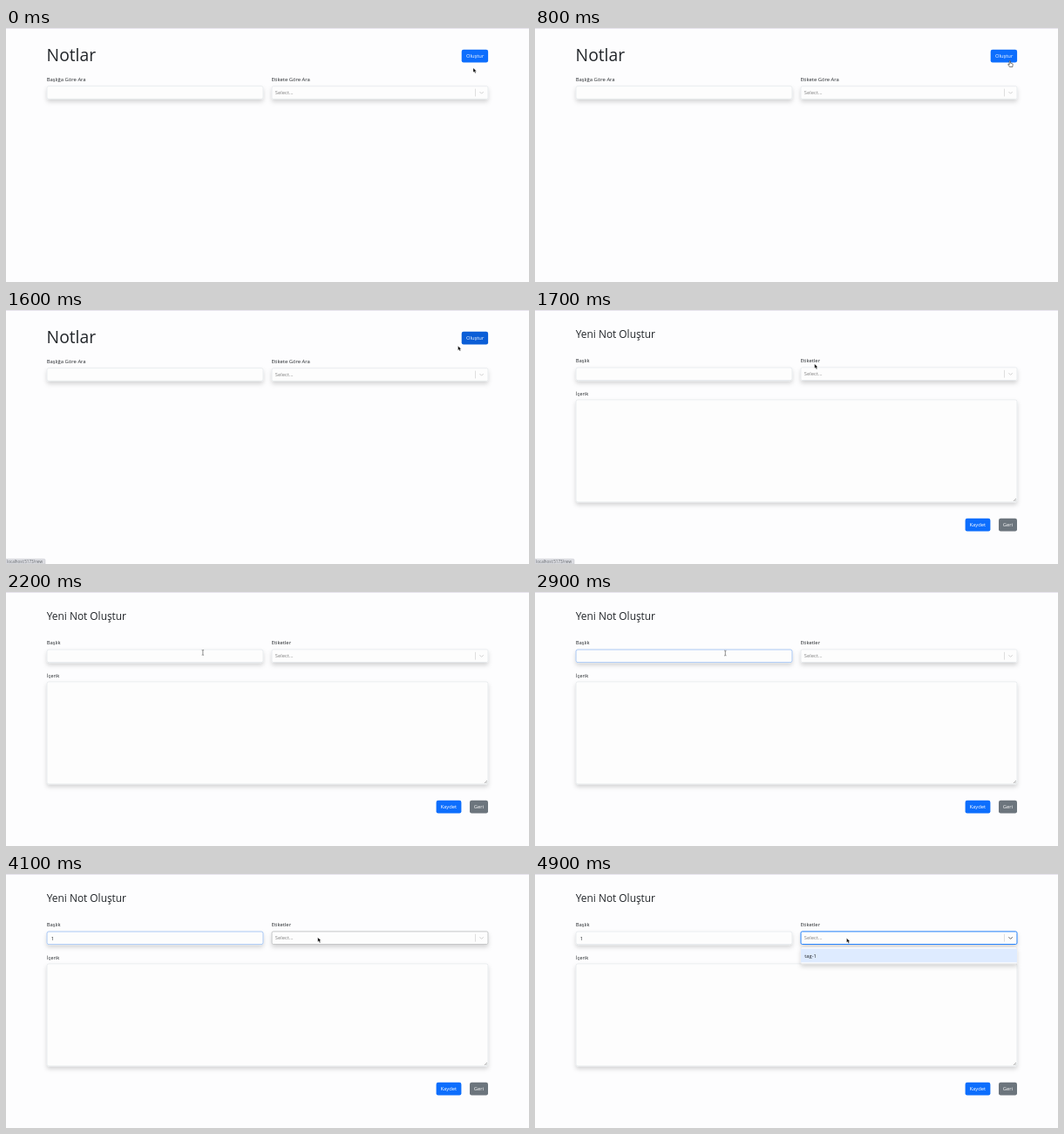
An HTML page for the animation above (5 s loop, 600x291 px).

```html
<!DOCTYPE html>
<html lang="tr">
<head>
<meta charset="utf-8">
<title>Notlar</title>
<style>
  html, body { margin: 0; width: 100%; height: 100%; overflow: hidden; background: #fdfdfe; }
  svg { display: block; width: 100vw; height: 100vh; }
  text { font-family: "Open Sans", "Noto Sans", sans-serif; font-size: 5.85px; fill: #212529; }
  .head { font-weight: 500; }
  .on { fill: #fff; }
  .hint { fill: #808080; }
  .box { fill: #fdfdfd; stroke: #dee2e6; stroke-width: .6; filter: url(#shade); }
  .line { fill: none; stroke-width: .6; }
</style>
</head>
<body>
<svg viewBox="0 0 600 291" preserveAspectRatio="none">
  <defs>
    <filter id="shade" filterUnits="userSpaceOnUse" x="30" y="50" width="540" height="190">
      <feDropShadow dx="0" dy="3" stdDeviation="2.8" flood-color="#000" flood-opacity=".17"/>
    </filter>
    <g id="select">
      <rect class="box" x="305" y="66.3" width="248" height="14.6" rx="1.6"/>
      <text class="hint" x="308.8" y="75.9">Select...</text>
      <path d="M538.5 69.2V78" stroke="#ccc" stroke-width=".6"/>
    </g>
    <path id="chevron" d="M543.7 72.9l1.9 1.9 1.9-1.9" fill="none" stroke-width=".9" stroke-linecap="round"/>
  </defs>

  <rect width="600" height="291" fill="#fdfdfe"/>
  <rect width="600" height="1" fill="#e6e3ec"/>

  <g id="list">
    <text class="head" x="46.6" y="38.4" style="font-size:19.3px">Notlar</text>
    <rect id="create" x="522.7" y="24.8" width="30.4" height="14.6" rx="2.2"/>
    <text class="on" x="527.9" y="34.4">Oluştur</text>
    <text x="46.8" y="61">Başlığa Göre Ara</text>
    <text x="304.8" y="61">Etikete Göre Ara</text>
    <rect class="box" x="47" y="66.6" width="248" height="14.6" rx="2"/>
    <g transform="translate(0 .4)">
      <use href="#select"/>
      <use href="#chevron" stroke="#ccc"/>
    </g>
  </g>

  <g id="form">
    <text class="head" x="46.8" y="31.7" style="font-size:11.9px">Yeni Not Oluştur</text>
    <text x="46.8" y="60.3">Başlık</text>
    <text x="304.8" y="60.3">Etiketler</text>
    <rect class="box" x="47" y="66" width="248" height="14.6" rx="2"/>
    <rect id="focus" class="line" x="47" y="66" width="248" height="14.6" rx="2" stroke="#86b7fe"/>
    <text id="typed" x="51.8" y="75.6">1</text>
    <text x="46.8" y="97.5">İçerik</text>
    <rect class="box" x="47" y="102.9" width="506" height="117" rx="2"/>
    <path d="M549 219l3-3M550.7 219l1.3-1.3" stroke="#666" stroke-width=".5"/>
    <g transform="translate(0 -.4)">
      <use href="#select"/>
      <rect id="ring" class="line" x="305" y="66.3" width="248" height="14.6" rx="1.6"/>
      <use id="arrowhead" href="#chevron"/>
    </g>
    <g id="menu">
      <rect x="305" y="84" width="248" height="18.8" rx="1.6" fill="#fff" stroke="#d9d9d9" stroke-width=".4" filter="url(#shade)"/>
      <rect x="305" y="85.5" width="248" height="15.8" fill="#deebff"/>
      <text x="309.2" y="95.6">tag-1</text>
    </g>
    <rect x="493.6" y="238.8" width="28.8" height="14.7" rx="2.2" fill="#0d6efd"/>
    <text class="on" x="498.4" y="248.4">Kaydet</text>
    <rect x="532" y="238.8" width="21" height="14.7" rx="2.2" fill="#6c757d"/>
    <text class="on" x="536.8" y="248.4">Geri</text>
  </g>

  <g id="status">
    <path d="M0 285.2H43.5q1.5 0 1.5 1.5V291H0z" fill="#dcdde2" stroke="#c4c5ca" stroke-width=".5"/>
    <text x="1.2" y="290.3" style="font-size:4.5px;fill:#5f6368">localhost:5173/new</text>
  </g>

  <g id="cursor">
    <path id="arrow" d="M0 0V5l1.2-1 .9 1.9 1-.5-.9-1.8h1.6z" fill="#000" stroke="#fff" stroke-width=".35"/>
    <path id="hand" d="M-.6 .4q.6-.9 1.2 0V2.8l2.2.6q.7.2.6 1L3 7.2H-.2L-2 4.6q-.2-.9.7-.6l.7.7z" fill="#fff" stroke="#111" stroke-width=".55" stroke-linejoin="round"/>
    <path id="beam" d="M-1.2-2.8H-.4L0-2.5.4-2.8H1.2M0-2.5V2.5M-1.2 2.8H-.4L0 2.5.4 2.8H1.2" fill="none" stroke="#444" stroke-width=".6"/>
  </g>
</svg>
<script>
const LOOP = 5000, STEP = 100;
const $ = id => document.getElementById(id);
const show = (id, on) => $(id).setAttribute("visibility", on ? "inherit" : "hidden");

// Pointer stops: time, x, y
const stops = [
  [0, 536, 45.8], [400, 536, 45.8], [800, 544.8, 37.4], [1500, 544.8, 37.4],
  [1600, 518.5, 41.2], [1700, 320.7, 61.8], [2300, 218.3, 70], [3300, 218.3, 70],
  [3800, 358.2, 70.3], [3900, 358.2, 70.3], [4200, 357.5, 73.6], [LOOP, 357.5, 73.6]
];

function pointer(t) {
  const i = stops.findIndex(s => s[0] > t);
  const [t0, x0, y0] = stops[i - 1], [t1, x1, y1] = stops[i];
  const u = (t - t0) / (t1 - t0), e = u * u * (3 - 2 * u);
  return [x0 + (x1 - x0) * e, y0 + (y1 - y0) * e];
}

function draw(t) {
  const within = (a, b) => t >= a && t < b;
  const [x, y] = pointer(t);
  const form = t >= 1700, open = t >= 4200;
  const overSelect = form && x > 305 && y > 66;

  show("list", !form);
  show("form", form);
  show("status", within(1000, 1900));
  $("create").setAttribute("fill", within(900, 1700) ? "#0b5ed7" : "#0d6efd");

  show("focus", within(2600, 4200));
  show("typed", t >= 3200);
  show("menu", open);
  $("ring").setAttribute("stroke", open ? "#2684ff" : overSelect ? "#b3b3b3" : "none");
  $("ring").style.strokeWidth = open ? 1 : .6;
  $("arrowhead").setAttribute("stroke", open ? "#555" : "#ccc");

  const hand = !form && x > 522.7 && y < 39.4;
  const beam = form && x < 295 && y > 66;
  $("cursor").setAttribute("transform", `translate(${x} ${y})`);
  show("hand", hand);
  show("beam", beam);
  show("arrow", !hand && !beam);
}

const start = performance.now();
function tick() {
  const t = (performance.now() - start) % LOOP;
  draw(Math.floor(t / STEP) * STEP);
  requestAnimationFrame(tick);
}
tick();
</script>
</body>
</html>
```
